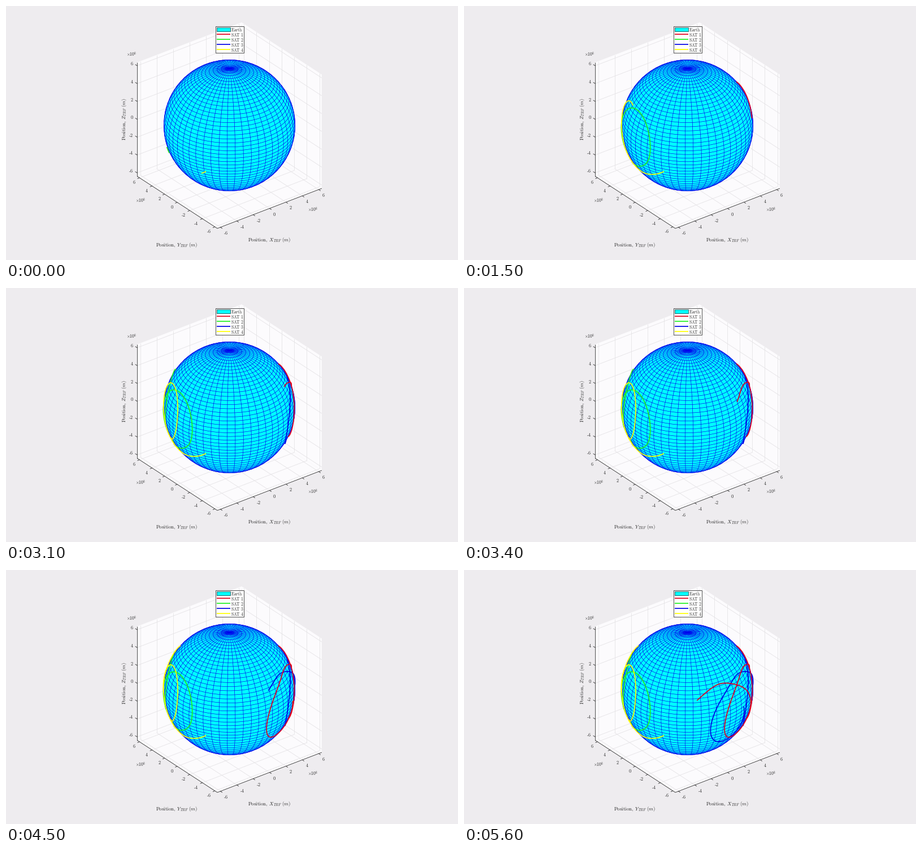
Write a matplotlib script that moves like this. It is 800 by 450 pixels and loops after 5.7 s.

```python
import numpy as np
import matplotlib.pyplot as plt
from matplotlib.animation import FuncAnimation
from matplotlib.patches import Circle, Polygon, Rectangle

W, H, DPI = 800, 450, 100
PX = 72 / DPI
FRAMES, STEP = 57, 100
CX, CY, SCALE = 395.5, 211.5, 116.5
LIMIT = 6.378          # axis limit in units of 1e6 m
GLOBE, SHELL = 0.997, 1.008   # globe and track radius relative to the limit
AZ, EL = np.radians([-37.5, 30])
CYAN, EDGE, INK, GRID = "#00ffff", "#0000ee", "#262626", "#e4e2e5"

plt.rcParams["mathtext.fontset"] = "cm"
fig = plt.figure(figsize=(W / DPI, H / DPI), dpi=DPI, facecolor="#eeecef")
ax = fig.add_axes([0, 0, 1, 1])
ax.set(xlim=(0, W), ylim=(H, 0))
ax.axis("off")


def project(x, y, z):
    """Orthographic view: screen x, screen y and depth towards the viewer."""
    sa, ca, se, ce = np.sin(AZ), np.cos(AZ), np.sin(EL), np.cos(EL)
    right = ca * x + sa * y
    up = -sa * se * x + ca * se * y + ce * z
    depth = sa * ce * x - ca * ce * y + se * z
    return CX + SCALE * right, CY - SCALE * up, depth


def on_sphere(lon, lat, r):
    return project(r * np.cos(lat) * np.cos(lon), r * np.cos(lat) * np.sin(lon),
                   r * np.sin(lat) + 0 * lon)


def spot(*p):
    return np.array(project(*p)[:2])


def stroke(a, b, color, width, z):
    ax.plot([a[0], b[0]], [a[1], b[1]], color=color, lw=width * PX, zorder=z,
            solid_capstyle="butt")


def label(x, y, s, size=8.3, ha="center", va="center_baseline", z=9, **kw):
    ax.text(x, y - 0.6, f"${s}$", fontsize=size * PX, ha=ha, va=va,
            color=INK, zorder=z, **kw)


def draw_walls():
    faces = [
        [(-1, -1, -1), (1, -1, -1), (1, 1, -1), (-1, 1, -1)],
        [(-1, 1, -1), (1, 1, -1), (1, 1, 1), (-1, 1, 1)],
        [(1, -1, -1), (1, 1, -1), (1, 1, 1), (1, -1, 1)],
    ]
    for face in faces:
        ax.add_patch(Polygon([spot(*p) for p in face], fc="#fcfbfd", ec="none", zorder=0))
    for v in np.arange(-6, 7, 2) / LIMIT:
        for a, b in [((v, -1, -1), (v, 1, -1)), ((v, 1, -1), (v, 1, 1)),
                     ((-1, v, -1), (1, v, -1)), ((1, v, -1), (1, v, 1)),
                     ((-1, 1, v), (1, 1, v)), ((1, -1, v), (1, 1, v))]:
            stroke(spot(*a), spot(*b), GRID, 0.8, 1)


def draw_axes():
    front, side = spot(-1, -1, -1), spot(-1, 1, -1)
    for a, b in [(front, spot(1, -1, -1)), (front, side), (side, spot(-1, 1, 1))]:
        stroke(a, b, INK, 0.8, 2)
    for n in range(-6, 7, 2):
        v = n / LIMIT
        s = rf"\text{{{n}}}"
        for p, tick, text, ha in [
            (spot(v, -1, -1), (3.4, 2.2), (6, 9.5), "left"),
            (spot(-1, v, -1), (-3.8, 1.5), (-6.5, 7.3), "right"),
            (spot(-1, 1, v), (-3.4, -2.2), (-6.5, -4), "right"),
        ]:
            stroke(p, p + tick, INK, 0.8, 2)
            label(*(p + text), s, ha=ha)
    for x, y in [(222, 84.5), (238, 344), (543, 360)]:
        label(x, y, r"\times 10^{6}", 7.6)
    title = r"\mathrm{Position,}\ %s_{TRF}\ (m)"
    label(466, 413, title % "X", 8.8)
    label(302.3, 422.5, title % "Y", 8.8)
    label(209, 201.6, title % "Z", 8.8, va="center", rotation=90)


def draw_globe():
    ax.add_patch(Circle((CX, CY), GLOBE * SCALE, fc=CYAN, ec=EDGE, lw=0.8 * PX, zorder=3))

    def wire(lon, lat):
        x, y, depth = on_sphere(lon, lat, GLOBE)
        ax.plot(np.where(depth >= 0, x, np.nan), y, color=EDGE, lw=0.64 * PX, zorder=4)

    around = np.linspace(-np.pi, np.pi, 361)
    for lon in np.linspace(-np.pi, np.pi, 51)[:-1]:
        wire(lon, around / 2)
    for lat in np.linspace(-np.pi / 2, np.pi / 2, 51)[1:-1]:
        wire(around, lat)


def draw_legend():
    ax.add_patch(Rectangle((370.5, 36), 50.5, 46.5, fc="white", ec=INK,
                           lw=0.8 * PX, zorder=10))
    ax.add_patch(Rectangle((372.5, 38), 24.5, 6.5, fc=CYAN, ec=INK,
                           lw=0.7 * PX, zorder=11))
    for i, s in enumerate(["Earth"] + [rf"SAT\ {k}" for k in range(1, 5)]):
        y = 41.2 + 9 * i
        label(398.5, y + 0.3, rf"\mathrm{{{s}}}", 7.6, "left", z=11)
        if i:
            stroke((372.5, y), (397, y), SATS[i - 1][0], 1.7, 11)


PERIOD, INCL = 2.12, np.radians(30.5)
DRIFT = np.radians(19.3)      # westward drift of the loops per second
FACING = AZ - np.pi / 2       # longitude turned to the viewer

# colour, layer, argument of perigee, eccentricity,
# perigee time (s) and perigee longitude from the facing meridian (deg)
SATS = [
    ("#e0001c", 8, 270, 0.22, 4.14, 54),
    ("#20f020", 5, 90, 0.28, 0.53, -60),
    ("#0000e6", 6, 270, 0.22, 5.22, 40),
    ("#ffff00", 7, 90, 0.25, 1.48, -75),
]


def ground_track(t, arg, ecc, t_peri, lon_peri):
    """Eccentric inclined orbit seen from the turning globe, hidden behind it."""
    arg, lon_peri = np.radians([arg, lon_peri])
    mean = 2 * np.pi * (t - t_peri) / PERIOD
    centre = 2 * ecc * np.sin(mean) + 1.25 * ecc ** 2 * np.sin(2 * mean)
    u = arg + mean + centre
    lat = np.arcsin(np.sin(INCL) * np.sin(u))
    ascension = np.arctan2(np.cos(INCL) * np.sin(u), np.cos(u))
    lon = FACING + lon_peri + ascension - arg - mean - DRIFT * (t - t_peri)
    x, y, depth = on_sphere(lon, lat, SHELL)
    hidden = (depth < 0) & (np.hypot(x - CX, y - CY) < GLOBE * SCALE)
    return np.where(hidden, np.nan, x), y


draw_walls()
draw_axes()
draw_globe()
draw_legend()

times = np.arange(-0.06, FRAMES * STEP / 1000, 0.01)
tracks = [ground_track(times, *orbit) for _, _, *orbit in SATS]
lines = [ax.plot([], [], color=color, lw=1.7 * PX, zorder=layer)[0]
         for color, layer, *_ in SATS]


def update(n):
    seen = times <= n * STEP / 1000 + 1e-6
    for line, (x, y) in zip(lines, tracks):
        line.set_data(x[seen], y[seen])
    return lines


anim = FuncAnimation(fig, update, frames=FRAMES, interval=STEP, repeat=True,
                     repeat_delay=0, blit=False)
plt.show()
```
